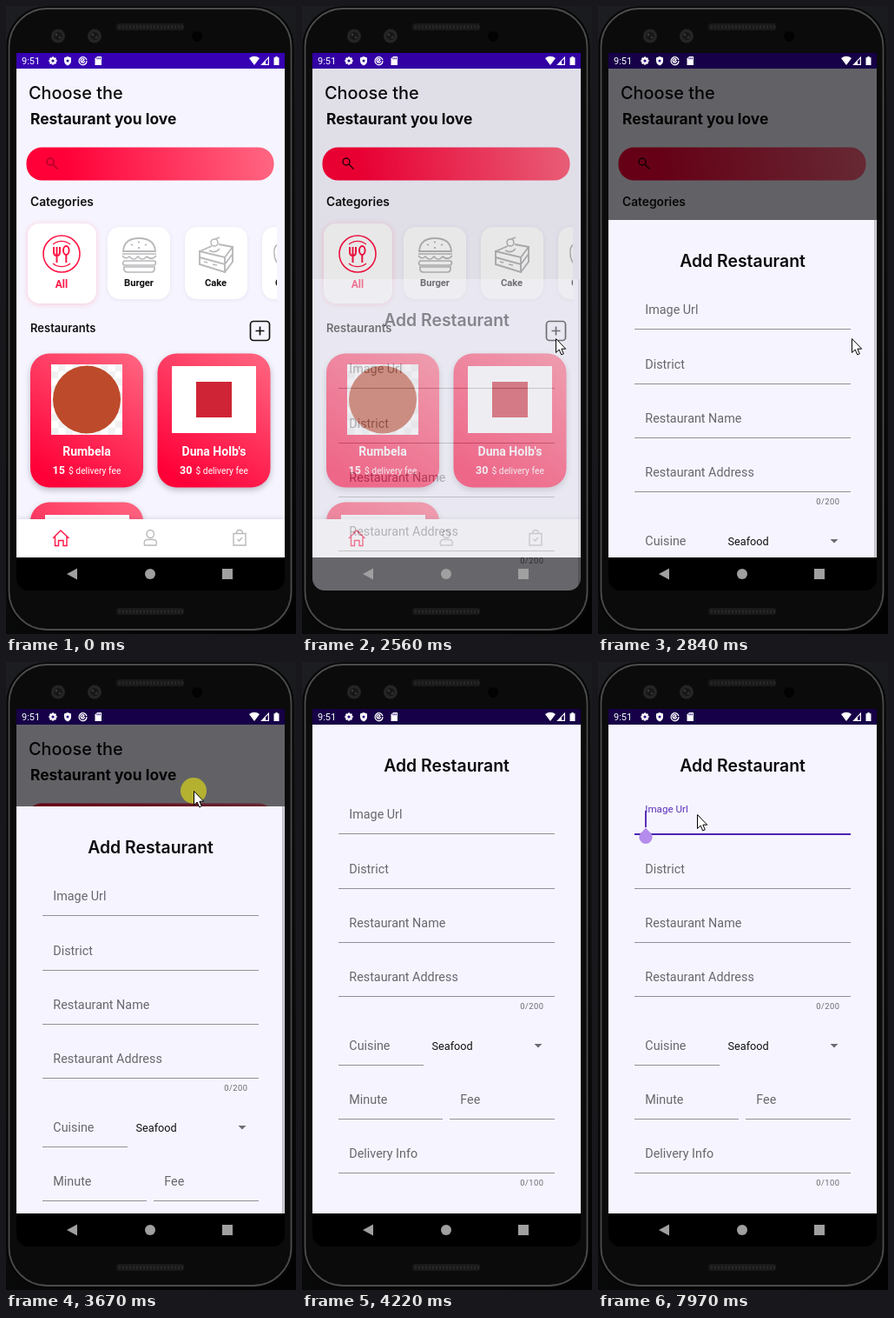
Recreate the animation shown at these times as an HTML page with a canvas. Size 334 px wide and 722 px high, loop 8 s.

```html
<!DOCTYPE html>
<html lang="en">
<head>
<meta charset="utf-8">
<title>Add Restaurant</title>
<style>
html, body { margin: 0; width: 100%; height: 100%; overflow: hidden; background: #050505; }
canvas { display: block; }
</style>
</head>
<body>
<canvas id="stage" width="334" height="722"></canvas>
<script>
const stage = document.getElementById('stage').getContext('2d');
const layer = document.createElement('canvas');
layer.width = 334;
layer.height = 722;
const layerCtx = layer.getContext('2d');
let ctx = stage;

const LOOP = 8000;
const HEAD = 'Inter, sans-serif', BODY = 'Roboto, sans-serif';
const PAPER = '#f6f5ff', RED = '#ff1545', GREY = '#b9b9bc', LABEL = '#68676d';

// Bursts of motion: start, end, number of steps
const BURSTS = [[270, 740, 7], [940, 1430, 8], [2560, 2840, 5], [3240, 4010, 12],
  [4080, 4220, 3], [6420, 6970, 8], [7760, 7970, 4]];

// Keyframes: time, then values
const POINTER = [[270, 304, 400], [500, 285, 376], [740, 300, 361], [940, 299, 364], [1430, 292, 382],
  [3170, 292, 382], [3380, 236, 304], [3450, 231, 286], [3660, 216, 148], [3870, 212, 98], [4010, 212, 92],
  [6420, 45, 182], [6580, 98, 197], [6740, 154, 182], [6860, 138, 165], [6970, 114, 175]];
const SHEET_TOP = [[2490, 350], [2560, 314], [2630, 276], [2700, 255], [2770, 246], [3450, 246],
  [3660, 166], [3870, 106], [4010, 84], [4150, 74], [4220, 72]];
const SHEET_ALPHA = [[2490, 0], [2560, 0.42], [2700, 0.88], [2770, 1]];
const DIM = [[2490, 0], [2560, 0.09], [2840, 0.6]];

function stepped(t) {
  let q = 0;
  for (const [start, end, n] of BURSTS) {
    const step = (end - start) / (n - 1);
    if (t >= start) q = Math.min(end, start + Math.floor((t - start) / step + 1e-6) * step);
  }
  return q;
}

function track(keys, t) {
  if (t <= keys[0][0]) return keys[0].slice(1);
  for (let i = 1; i < keys.length; i++) {
    const a = keys[i - 1], b = keys[i];
    if (t <= b[0]) {
      const k = (t - a[0]) / (b[0] - a[0]);
      return b.slice(1).map((v, j) => a[j + 1] + (v - a[j + 1]) * k);
    }
  }
  return keys[keys.length - 1].slice(1);
}

function rect(x, y, w, h, color) {
  ctx.fillStyle = color;
  ctx.fillRect(x, y, w, h);
}

function rounded(x, y, w, h, r) {
  ctx.beginPath();
  ctx.roundRect(x, y, w, h, r);
}

function panel(x, y, w, h, r, color) {
  rounded(x, y, w, h, r);
  ctx.fillStyle = color;
  ctx.fill();
}

function disc(x, y, r, color) {
  ctx.beginPath();
  ctx.arc(x, y, r, 0, 7);
  ctx.fillStyle = color;
  ctx.fill();
}

function fillPath(d, color) {
  ctx.fillStyle = color;
  ctx.fill(new Path2D(d));
}

function strokePath(d, color, width = 1.4) {
  ctx.strokeStyle = color;
  ctx.lineWidth = width;
  ctx.stroke(new Path2D(d));
}

function text(str, x, baseline, font, color, align = 'left') {
  ctx.font = font;
  ctx.fillStyle = color;
  ctx.textAlign = align;
  ctx.fillText(str, x, baseline);
}

function shadowed(color, blur, dy, draw) {
  ctx.save();
  ctx.shadowColor = color;
  ctx.shadowBlur = blur;
  ctx.shadowOffsetY = dy;
  draw();
  ctx.restore();
}

function gradient(x0, y0, x1, y1, from, to) {
  const g = ctx.createLinearGradient(x0, y0, x1, y1);
  g.addColorStop(0, from);
  g.addColorStop(1, to);
  return g;
}

const redGradient = (...line) => gradient(...line, '#ff0038', '#ff6480');

function drawPhone() {
  rect(0, 0, 334, 722, gradient(0, 150, 334, 700, '#1b1d20', '#020202'));
  panel(0.5, 0.5, 331, 719, 46, '#050505');
  panel(3.5, 3, 325, 714, 44, '#0b0b0c');
  ctx.lineWidth = 1.8;
  ctx.strokeStyle = '#4b4b4c';
  ctx.stroke();
  for (const y of [20, 692]) {
    panel(127, y, 78, 8, 3, '#191919');
    for (let x = 130; x < 203; x += 4) rect(x, y + 2, 2, 4, '#262626');
  }
  for (const x of [60, 102]) {
    disc(x, 34.5, 8, '#252525');
    disc(x, 34.5, 4.5, '#171717');
    disc(x - 2, 33, 1.3, '#3a3a3a');
    disc(x + 2, 36, 1.3, '#333');
  }
  disc(220, 35, 6, '#020202');
}

function drawStatusIcons() {
  text('9:51', 18, 67, `11px ${BODY}`, '#fff');
  for (let i = 0; i < 4; i++) {
    ctx.save();
    ctx.translate(54, 63);
    ctx.rotate(i * Math.PI / 4);
    rect(-4.6, -1.2, 9.2, 2.4, '#fff');
    ctx.restore();
  }
  disc(54, 63, 3.6, '#fff');
  disc(54, 63, 1.6, '#2a0085');
  fillPath('M71 58L75 59.6V63Q75 66.5 71 68.5Q67 66.5 67 63V59.6Z', '#fff');
  disc(71, 63, 1.5, '#2a0085');
  strokePath('M93 63A4.5 4.5 0 1 1 92.9 62.2M90.5 63A2.2 2.2 0 1 1 90 61.5L86.5 65', '#fff', 1.3);
  fillPath('M102.5 60.5L105 58H110V68H102.5Z', '#fff');
  for (const x of [104.5, 106.3, 108.1]) rect(x, 59.3, 0.9, 2, '#2a0085');
  fillPath('M280 60Q286 55.5 292 60L286 68Z', '#fff');
  strokePath('M294.6 67.4H302.4V59.2Z', '#fff', 1.2);
  fillPath('M294 68L299 63V68Z', '#fff');
  fillPath('M308.5 59.2H310.3V58H312.7V59.2H314.5V68H308.5Z', '#fff');
}

function drawCategories() {
  ctx.save();
  ctx.beginPath();
  ctx.rect(12, 240, 300, 115);
  ctx.clip();
  shadowed('rgba(255,60,90,.25)', 7, 1, () => panel(25, 250, 79, 92, 14, '#fff'));
  for (const x of [117, 206, 295])
    shadowed('rgba(90,90,130,.12)', 5, 1, () => panel(x, 254, 72, 83, 14, '#fff'));

  strokePath('M43 285a21 21 0 1 1 42 0a21 21 0 1 1 -42 0', RED, 1.6);
  strokePath('M54 274A15.5 15.5 0 0 1 74 274M54 296A15.5 15.5 0 0 0 74 296', RED, 1.3);
  strokePath('M55 277V283Q55 287 58.5 287Q62 287 62 283V277M58.5 277V295', RED, 2);
  strokePath('M66 281a3.3 5 0 1 1 6.6 0a3.3 5 0 1 1 -6.6 0M69.3 286V295', RED, 2);
  text('All', 64, 324, `700 12px ${BODY}`, RED, 'center');

  strokePath('M135 282Q136 267 153 267Q171 267 172 282ZM144 274l2 1M152 271l2 1M160 275l2 -1M152 278h2', GREY, 1.8);
  strokePath('M134 285H173M134 287Q138 292 142 288Q147 294 152 288Q157 294 162 288Q168 293 173 287', GREY, 1.7);
  strokePath('M136 293H171Q174 295 171 298H136Q133 296 136 293ZM136 300H171Q172 306 167 306H140Q135 306 136 300Z', GREY, 1.7);
  text('Burger', 153, 322, `700 11.2px ${BODY}`, '#111', 'center');

  strokePath('M223 282L237 276M245 274L261 277L252 289L223 282V297L252 306V289M261 277V294L252 306M223 289L252 297L261 285', GREY, 1.9);
  strokePath('M236 272a4 4 0 1 1 8 0a4 4 0 1 1 -8 0M241 268L246 266M228 294l4 1M238 297l5 1M234 281q7 4 12 -2', GREY, 1.6);
  text('Cake', 241.5, 322, `700 11.2px ${BODY}`, '#111', 'center');

  strokePath('M313 274Q308 277 309 284Q309 292 313 296', GREY, 1.5);
  text('C', 310, 322, `700 11.2px ${BODY}`, '#111');
  ctx.restore();
}

function drawCard(x, y) {
  shadowed('rgba(60,50,70,.32)', 7, 3, () => panel(x, y, 130, 154, 22, redGradient(x + 25, y + 145, x + 120, y)));
}

function drawCaption(x, name, fee) {
  text(name, x + 65, 517, `700 14px ${BODY}`, '#fff', 'center');
  text(fee, x + 25.5, 538, `700 12.5px ${BODY}`, '#fff');
  text('$ delivery fee', x + 44, 538, `10.3px ${BODY}`, '#fff');
}

function drawRestaurants() {
  text('Restaurants', 28, 375, `600 13px ${HEAD}`, '#111');
  rounded(281.5, 362.5, 22, 22, 3.5);
  ctx.strokeStyle = '#111';
  ctx.lineWidth = 1.7;
  ctx.stroke();
  strokePath('M287.5 373.5H297.5M292.5 368.5V378.5', '#111', 1.7);

  drawCard(28, 399.5);
  rect(52, 412, 82, 81, '#fff');
  for (let i = 0; i < 100; i++) {
    const col = i % 10, row = Math.floor(i / 10);
    if ((col + row) % 2) rect(52 + col * 8.2, 412 + row * 8.1, 8.2, 8.1, '#f1f1f1');
  }
  disc(93, 452.5, 39, '#bd4a2b');
  drawCaption(28, 'Rumbela', '15');

  drawCard(174.5, 399.5);
  rect(191, 414, 97, 77, '#fff');
  rect(219, 432, 41, 41, '#cf2435');
  drawCaption(174.5, "Duna Holb's", '30');

  drawCard(28, 570.5);
  rect(45, 585, 97, 20, '#fff');
}

function drawTabs() {
  shadowed('rgba(80,80,110,.18)', 5, -1, () => rect(12, 590, 309, 44, '#fff'));
  strokePath('M54 612L63 603L72.5 612M56.5 610V620.5H60.5V614.5H66V620.5H70V610', RED, 1.4);
  strokePath('M162 607a4.2 4.5 0 1 1 8.4 0a4.2 4.5 0 1 1 -8.4 0M159.5 620Q158 613.5 163 613.5H169.5Q174.5 613.5 173 620Z', GREY);
  strokePath('M262 606.5H276V620H262ZM265.5 606.5Q265.5 602.5 269 602.5Q272.5 602.5 272.5 606.5M266.5 613L268.5 615L272 611', GREY);
}

function drawHome(searchColor) {
  rect(12, 54, 309, 580, PAPER);
  rect(12, 54, 309, 18, '#3700b3');
  text('Choose the', 26, 107, `500 19.9px ${HEAD}`, '#0b0b0d');
  text('Restaurant you love', 28, 136, `700 17.4px ${HEAD}`, '#0b0b0d');
  panel(23.5, 162.5, 285, 38, 18, redGradient(70, 196, 300, 160));
  strokePath('M47 179a4 4 0 1 1 8 0a4 4 0 1 1 -8 0M54 182L59.5 187.5', searchColor, 1.4);
  text('Categories', 28, 230, `600 13.8px ${HEAD}`, '#111');
  drawCategories();
  drawRestaurants();
  drawTabs();
  rect(12, 634, 309, 38, '#000');
}

function drawField(label, x, right, line) {
  text(label, x + 12.3, Math.round(line - 17.5), `14.35px ${BODY}`, LABEL);
  rect(x, Math.floor(line), right - x, 1, '#929198');
}

function drawCounter(str, baseline) {
  ctx.letterSpacing = '0.5px';
  text(str, 278.5, baseline, `9.3px ${BODY}`, LABEL, 'right');
  ctx.letterSpacing = '0px';
}

function drawFocusedField(k) {
  const purple = '#5b2fb8';
  text('Image Url', 54.3, 108 - 7 * k, `${14.35 - 2.75 * k}px ${BODY}`, k < 0.5 ? LABEL : purple);
  rect(42, 125, 249, 1, '#929198');
  const left = 114 - 72 * k, right = 114 + 177 * k;
  rect(left, 125, right - left, 2, '#4a25b4');
  if (k < 0.5) return;
  rect(54, 99, 2, 19, purple);
  disc(55, 129.5, 7.6, '#b48cec');
  fillPath('M55 118.5L61.5 126H48.5Z', '#b48cec');
}

// The sheet is laid out from its own top edge
function drawSheet(top, focus) {
  ctx.save();
  ctx.translate(0, Math.round(top));
  const shift = Math.max(0, top - 246);
  const floor = 634 + shift - top;
  rect(12, floor, 309, 60, '#000');
  ctx.beginPath();
  ctx.rect(12, 0, 309, floor);
  ctx.clip();
  rect(12, 0, 309, floor, PAPER);
  if (top > 72) rect(318, 0, 2.5, floor, '#c3c2ca');
  text('Add Restaurant', 166.5, 54, `600 19.4px ${HEAD}`, '#0b0b0d', 'center');
  if (focus > 0) drawFocusedField(focus);
  else drawField('Image Url', 42, 291, 125.3);
  drawField('District', 42, 291, 188);
  drawField('Restaurant Name', 42, 291, 250.2);
  drawField('Restaurant Address', 42, 291, 312.6);
  drawCounter('0/200', 327);
  drawField('Cuisine', 42, 140, 391);
  text('Seafood', 149.5, 373.5, `12.7px ${BODY}`, '#111');
  fillPath('M267.5 367H276.5L272 371.5Z', '#6d6c73');
  drawField('Minute', 42, 162, 453);
  drawField('Fee', 170, 291, 453);
  drawField('Delivery Info', 42, 291, 515.8);
  drawCounter('0/100', 530);
  ctx.restore();
}

// Fades the sheet as one flat layer
function blendSheet(top, alpha, focus) {
  layerCtx.clearRect(0, 0, 334, 722);
  ctx = layerCtx;
  drawSheet(top, focus);
  ctx = stage;
  ctx.globalAlpha = alpha;
  ctx.drawImage(layer, 0, 0);
  ctx.globalAlpha = 1;
}

function drawSystemKeys() {
  const color = '#a0a0a0';
  fillPath('M70 653L82 646.5V659.5Z', color);
  disc(166, 653, 6, color);
  rect(249, 647, 12, 12, color);
}

function drawPointer(x, y, pressed) {
  if (pressed) disc(x, y, 15, 'rgba(255,250,0,.52)');
  ctx.save();
  ctx.translate(x + 0.5, y + 0.5);
  const arrow = 'M0 0V16L3.7 12.6L6.2 18.4L8.8 17.3L6.4 11.7H11.2Z';
  fillPath(arrow, '#fff');
  strokePath(arrow, '#000', 1);
  ctx.restore();
}

function render(t) {
  const q = stepped(t);
  drawPhone();
  ctx.save();
  rounded(12, 54, 309, 618, [0, 0, 14, 14]);
  ctx.clip();
  drawHome(q < 2560 ? '#a80026' : '#240009');
  if (q >= 2560) {
    rect(12, 54, 309, 580, `rgba(0,0,0,${track(DIM, q)[0]})`);
    const focus = q < 7760 ? 0 : (q - 7690) / 280;
    blendSheet(track(SHEET_TOP, q)[0], track(SHEET_ALPHA, q)[0], focus);
  }
  drawStatusIcons();
  drawSystemKeys();
  ctx.restore();

  if ((q >= 270 && q < 4080) || q >= 6420) {
    const [x, y] = track(POINTER, q);
    const tapping = t >= 1830 && t < 2030;
    const dragging = q >= 3440 && q < 3870;
    drawPointer(x, y, tapping || dragging);
  }
}

function tick() {
  render(performance.now() % LOOP);
  requestAnimationFrame(tick);
}
tick();
</script>
</body>
</html>
```
